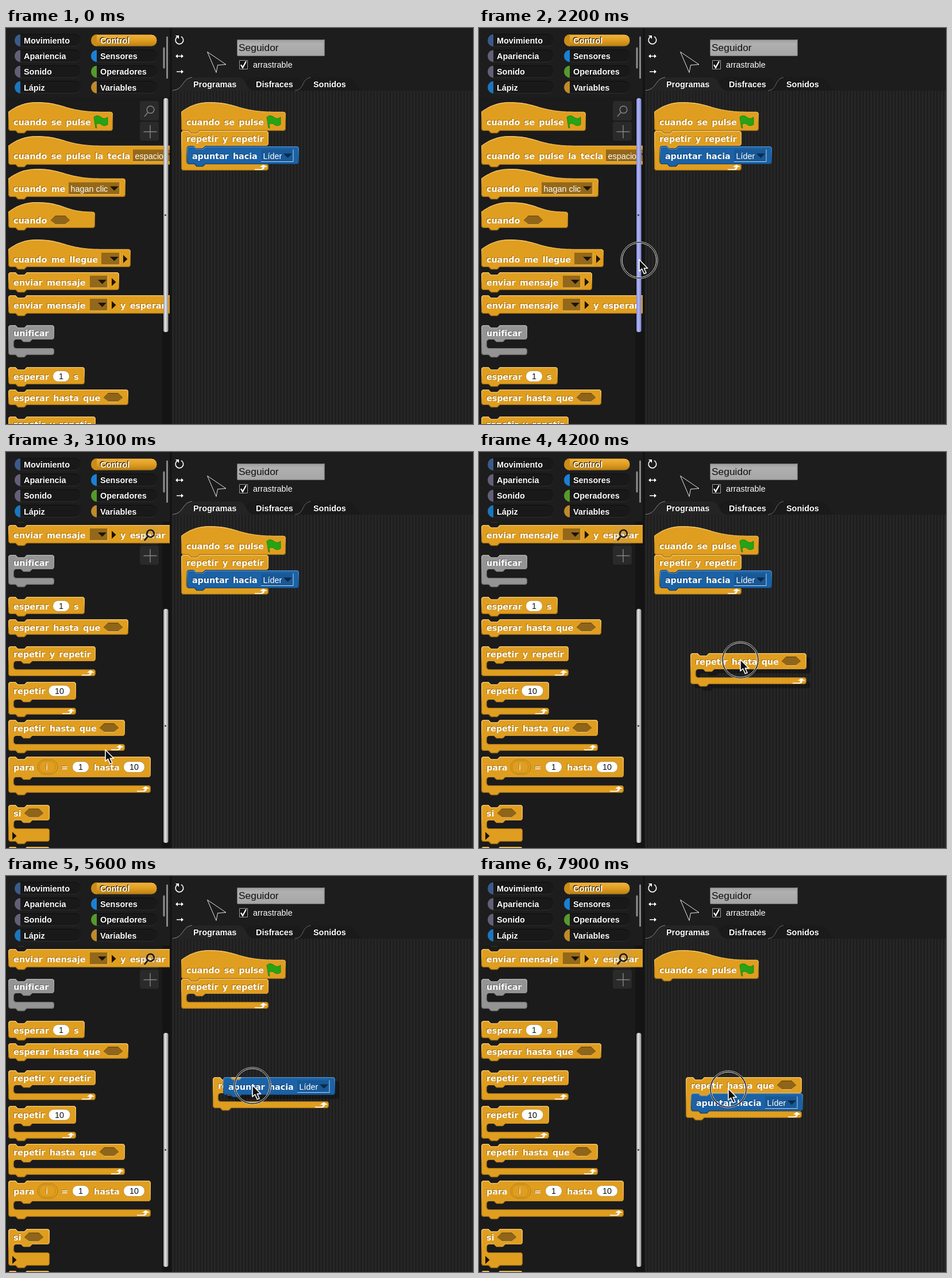
An HTML page that plays this animation: 813 by 689 pixels, repeating every 8000 ms.

```html
<!DOCTYPE html>
<html lang="es">
<head>
<meta charset="utf-8">
<title>Editor de bloques</title>
<style>
  html, body { margin: 0; width: 100%; height: 100%; overflow: hidden; background: #1d1d1d; }
  svg { display: block; }
  text { white-space: pre; }
  .label { font: bold 14.25px "DejaVu Sans", Verdana, sans-serif; word-spacing: 2.4px; fill: #fff; }
  .orange .label { text-shadow: -1px -1px 0 #9c6c10; }
  .blue .label { text-shadow: -1px -1px 0 #10406e; }
  .grey .label { text-shadow: -1px -1px 0 #626262; }
  .plain { font: 14.4px "Liberation Sans", Arial, sans-serif; fill: #fff; }
  .bold { font: bold 14.4px "Liberation Sans", Arial, sans-serif; fill: #fff; text-shadow: -1px -1px 0 #000; }
  .body { stroke-width: 2.6; }
  .orange > .body { fill: #e09e20; stroke: url(#edgeOrange); }
  .blue > .body { fill: #1b62a6; stroke: url(#edgeBlue); }
  .grey > .body { fill: #949494; stroke: url(#edgeGrey); }
  .dragged { filter: drop-shadow(7px 7px 0 rgba(0, 0, 0, .3)); }
</style>
</head>
<body>
<svg id="stage" width="813" height="689" viewBox="0 0 813 689">
  <defs>
    <linearGradient id="edgeOrange" x2="0" y2="1"><stop stop-color="#f6cd7c"/><stop offset=".35" stop-color="#eab450"/><stop offset=".6" stop-color="#b98018"/><stop offset="1" stop-color="#9a6c14"/></linearGradient>
    <linearGradient id="edgeBlue" x2="0" y2="1"><stop stop-color="#5a94cc"/><stop offset=".5" stop-color="#1b62a6"/><stop offset="1" stop-color="#0e3c68"/></linearGradient>
    <linearGradient id="edgeGrey" x2="0" y2="1"><stop stop-color="#b8b8b8"/><stop offset=".5" stop-color="#8c8c8c"/><stop offset="1" stop-color="#666"/></linearGradient>
    <linearGradient id="sunk" x2="0" y2="1"><stop stop-color="#5a3e0c"/><stop offset=".5" stop-color="#8a6118"/><stop offset="1" stop-color="#f0c265"/></linearGradient>
    <linearGradient id="pillEdge" x2="0" y2="1"><stop stop-color="#0c0c0c"/><stop offset="1" stop-color="#2e2e2e"/></linearGradient>
    <linearGradient id="pill" x2="0" y2="1"><stop stop-color="#f0b443"/><stop offset=".5" stop-color="#e09e20"/><stop offset="1" stop-color="#b87e12"/></linearGradient>
    <linearGradient id="field" x2="0" y2="1"><stop stop-color="#9c9c9c"/><stop offset=".25" stop-color="#b0b0b0"/><stop offset="1" stop-color="#a6a6a6"/></linearGradient>
    <linearGradient id="bar"><stop stop-color="#8a8a8a"/><stop offset=".4" stop-color="#e6e6e6"/><stop offset="1" stop-color="#909090"/></linearGradient>
    <linearGradient id="barHot"><stop stop-color="#7c83c8"/><stop offset=".4" stop-color="#b2b8fb"/><stop offset="1" stop-color="#7f86cc"/></linearGradient>
    <pattern id="stripes" x="289" width="5.6" height="8" patternUnits="userSpaceOnUse"><path fill="#262626" d="M0 0h5.600v8H0z"/><path fill="#1c1c1c" d="M3.400 0h2.200v8H3.400z"/></pattern>
    <clipPath id="paletteClip"><path d="M0 122h285v567H0z"/></clipPath>
  </defs>

  <!-- panels -->
  <path fill="#1d1d1d" d="M0 0h813v689H0z"/>
  <path fill="#1b1b1b" d="M0 121h285v568H0z"/>
  <path fill="#141414" d="M272 121h13v568h-13zM285 0h4v689h-4z"/>
  <path fill="url(#stripes)" d="M289 109h524v580H289z"/>
  <g id="categories"></g>
  <path stroke="#8e8e8e" stroke-width="3" stroke-linecap="round" d="M275 35v34"/>
  <path stroke="#9c9c9c" stroke-width="2.5" stroke-linecap="round" d="M280.5 16v71"/>

  <!-- sprite header -->
  <g fill="none" stroke="#fff" stroke-width="1.6">
    <path d="M298 15.5A6.8 6.8 0 1 0 305 15"/>
    <path d="M297 49h10M297 76h10" stroke-width="1.4"/>
  </g>
  <path fill="#fff" d="M295 13h6v6zM295 49l4-3.5v7zM309 49l-4-3.5v7zM309 76l-4-3.5v7z"/>
  <path fill="#1a1a1a" stroke="#e8e8e8" d="M350.500 41.500L383 63.500L368.500 64.500L366 77.500Z"/>
  <path fill="url(#field)" stroke="#6e6e6e" d="M402.500 20.500h151v27h-151z"/>
  <path fill="none" stroke="#d0d0d0" d="M403 48h151V20"/>
  <text x="405" y="40" class="plain" style="font-size:17.4px;fill:#111">Seguidor</text>
  <path fill="#161616" stroke="#a0a0a0" d="M406.500 56.500h14v15h-14z"/>
  <path fill="none" stroke="#fff" stroke-width="2.2" d="M409 64l3 5 6-11"/>
  <text x="430" y="69" class="plain">arrastrable</text>
  <g fill="none">
    <path fill="#1a1a1a" d="M500 109C516 108 512 86 530 86H594C610 86 608 108 624 109"/>
    <path fill="#1a1a1a" d="M400 109C416 108 414 86 430 86H502C516 86 514 108 530 109"/>
    <path stroke="#6c6c6c" d="M503 109C520 107 514 89 530 86"/>
    <path fill="#242424" d="M290 109C310 108 304 86 324 86H404C420 86 416 108 432 109"/>
    <path stroke="#8a8a8a" d="M290 108.500C310 107 306 88 324 86"/>
  </g>
  <text x="326" y="103" class="bold">Programas</text>
  <text x="435" y="103" class="bold">Disfraces</text>
  <text x="535" y="103" class="bold">Sonidos</text>

  <!-- palette -->
  <g clip-path="url(#paletteClip)"><g id="palette"></g></g>
  <g fill="rgba(150,150,150,.12)"><rect x="233" y="127" width="33" height="34" rx="4"/><rect x="233" y="163" width="33" height="33" rx="4"/></g>
  <g id="lens" fill="none"><circle cx="251.500" cy="142" r="6.300"/><path d="M247 147l-6 7"/></g>
  <path stroke="#858585" stroke-width="1.4" d="M239.500 180.500h23M251 169v23"/>
  <g id="thumb"><rect x="274" y="122" width="8.500" height="407" rx="3.500"/><circle cx="277.500" cy="325.500" r="1.500" fill="#333"/></g>

  <g id="scripts"></g>

  <g id="pointer">
    <g id="ring" fill="none"><circle cy="1" r="31" stroke="#161616" stroke-width="2.500"/><circle cy="1" r="32.200" stroke="#d8d8d8" stroke-width=".9"/><circle cy="1" r="29.800" stroke="#e6e6e6"/></g>
    <path fill="#111" stroke="#fff" stroke-width="1.600" stroke-linejoin="round" d="M0 0V20L4.500 16L8.300 24.500L12 23L8.300 15H14.500Z"/>
  </g>
</svg>

<script>
const LOOP = 8000, TICK = 100, SCROLL = 338, TRAVEL = 151;
const C = 4.2;                      // corner radius, also notch depth
const $ = id => document.getElementById(id);

function add(parent, tag, attrs = {}, text) {
  const el = document.createElementNS('http://www.w3.org/2000/svg', tag);
  for (const k in attrs) el.setAttribute(k, attrs[k]);
  if (text !== undefined) el.textContent = text;
  return parent.appendChild(el);
}

const arc = (x, y, sweep = 1) => `A${C} ${C} 0 0 ${sweep} ${x} ${y}`;
const notch = y => `L12.6 ${y}L16.8 ${y + C}H28L32.2 ${y}`;
const nub = (x, y) => `L${x + 32.2} ${y}L${x + 28} ${y + C}H${x + 16.8}L${x + 12.6} ${y}`;

// Outline of a block: hat or notch on top, optional C slot, nub unless capped
function outline({ w, h, hat, slot, foot, cap }) {
  const top = hat ? 16.8 : 0, arm = 9.5;
  let d = hat
    ? `M0 16.8A79.85 79.85 0 0 1 49 0C98 0 98 16.8 ${Math.min(166.6, w - C)} 16.8`
    : `M0 ${C}${arc(C, 0)}${notch(0)}`;
  d += `H${w - C}${arc(w, top + C)}V${h - C}${arc(w - C, h)}`;
  let end = h;
  if (slot) {
    const y = h + slot;
    end = y + foot;
    d += `${nub(arm, h)}H${arm + C}${arc(arm, h + C, 0)}V${y - C}${arc(arm + C, y, 0)}`;
    d += `H${w - C}${arc(w, y + C)}V${end - C}${arc(w - C, end)}`;
  }
  if (!cap) d += nub(0, end);
  return `${d}H${C}${arc(0, end - C)}Z`;
}

const parts = {
  text: (g, x, y, s) => add(g, 'text', { x, y: y + 5.5, class: 'label' }, s),
  menu(g, x, y, w, s = '', blue) {
    add(g, 'rect', { x, y: y - 11, width: w, height: 21, fill: blue ? '#185896' : '#94681a' });
    add(g, 'path', { d: `M${x} ${y + 10}h${w}v-21`, fill: 'none', stroke: blue ? '#b9d3ec' : '#f1c163' });
    add(g, 'text', { x: x + 3.5, y: y + 5, class: 'plain' }, s);
    add(g, 'path', { d: `M${x + w - 17} ${y - 4}h15l-7.500 7.500z`, fill: blue ? '#0b2a48' : '#1d1504' });
  },
  hex: (g, x, y) => add(g, 'path', {
    d: `M${x} ${y}l8-7.500h17l8 7.500-8 7.500h-17z`, fill: '#8f651a', stroke: 'url(#sunk)'
  }),
  num(g, x, y, rx, s) {
    add(g, 'rect', { x: x - rx, y: y - 9.5, width: 2 * rx, height: 19, rx: 9.5, fill: '#fff', stroke: '#a97714', 'stroke-width': .7 });
    add(g, 'text', { x, y: y + 5, class: 'plain', 'text-anchor': 'middle', style: 'fill:#111' }, s);
  },
  play: (g, x, y) => add(g, 'path', { d: `M${x} ${y - 7}l7.500 7-7.500 7z`, fill: '#1b1405' }),
  flag: (g, x, y) => add(g, 'path', {
    d: `M${x} ${y - 8}q6-5 12 0t12 0v13q-6 4-11 0t-9 0l1 6h-2z`, fill: '#23a515', stroke: '#23760f', 'stroke-width': .8
  }),
  ring(g, x, y, s) {
    add(g, 'rect', { x, y: y - 13, width: 35, height: 26, rx: 13, fill: 'none', stroke: '#b27c14' });
    add(g, 'rect', { x: x + 3, y: y - 10.5, width: 28, height: 21, rx: 10, fill: 'none', stroke: '#b98419' });
    add(g, 'text', { x: x + 14, y: y + 5, class: 'label', style: 'font-weight:normal' }, s);
  }
};

let blocks = 0;

// base: text baseline below the block's top
function block(parent, x, y, shape, base, list, color = 'orange') {
  const g = add(parent, 'g', { class: color, transform: `translate(${x} ${y})` });
  const d = outline(shape), id = `block${blocks++}`;
  add(add(g, 'clipPath', { id }), 'path', { d });
  add(g, 'path', { class: 'body', d, 'clip-path': `url(#${id})` });   // bevel stays inside
  for (const [kind, dx, ...args] of list) parts[kind](g, dx, base - 5.5, ...args);
  if (shape.loop) {
    add(g, 'path', {
      transform: `translate(${shape.w} ${shape.h + shape.slot + 1})`, fill: '#fff',
      d: 'M-24 8.500H-14Q-10.500 8.500-10.500 5H-15L-9 .5L-2 5H-7Q-7 10-13 10H-24Z'
    });
  }
  return g;
}

const hat = (w, h) => ({ w, h, hat: true });
const loop = (w, h, slot = 14, foot = 12) => ({ w, h, slot, foot, loop: true });
const forever = slot => ({ ...loop(152, 26, slot), cap: true });
const foreverParts = [['text', 9, 'repetir y repetir']];
const untilParts = [['text', 9, 'repetir hasta que'], ['hex', 159]];
const flagParts = [['text', 9, 'cuando se pulse'], ['flag', 149]];
const sendParts = [['text', 9, 'enviar mensaje'], ['menu', 142, 31], ['play', 180]];

[
  [129, hat(182, 50), 39.5, flagParts],
  [188, hat(310, 50), 40, [['text', 9, 'cuando se pulse la tecla'], ['menu', 217, 78, 'espacio']]],
  [245, hat(204, 49), 40, [['text', 9, 'cuando me'], ['menu', 105, 89, 'hagan clic']]],
  [303, hat(151, 45), 37, [['text', 9, 'cuando'], ['hex', 74]]],
  [368, hat(213, 48), 39.5, [['text', 9, 'cuando me llegue'], ['menu', 162, 32], ['play', 200]]],
  [425, { w: 193, h: 31 }, 22.5, sendParts],
  [465, { w: 300, h: 32 }, 22.5, [...sendParts, ['text', 195, 'y esperar']]],
  [517, { w: 80, h: 25, slot: 15, foot: 12 }, 18.5, [['text', 9, 'unificar']], 'grey'],
  [590, { w: 133, h: 30 }, 21.5, [['text', 9, 'esperar'], ['num', 92, 14.5, '1'], ['text', 114, 's']]],
  [629, { w: 209, h: 27 }, 19.5, [['text', 9, 'esperar hasta que'], ['hex', 166]]],
  [676, forever(14), 18.5, foreverParts],
  [738, loop(118, 31), 21, [['text', 9, 'repetir'], ['num', 89, 19, '10']]],
  [804, loop(203, 28), 19.5, untilParts],
  [868, loop(248, 36, 14, 13), 23.5, [['text', 9, 'para'], ['ring', 51, 'i'], ['text', 92, '='],
    ['num', 126, 14.5, '1'], ['text', 149, 'hasta'], ['num', 219, 18.5, '10']]],
  [952, { w: 72, h: 27, slot: 14, foot: 23 }, 20, [['text', 9, 'si'], ['hex', 28]]],
  [1025, { w: 72, h: 27 }, 20, []]
].forEach(([y, ...rest]) => block($('palette'), 4, y, ...rest));
parts.play($('palette'), 11, 1006);

const scripts = $('scripts');
block(scripts, 305, 129, hat(182, 50), 39.5, flagParts);
const foreverFull = block(scripts, 305, 179, forever(31), 18.5, foreverParts);
const untilEmpty = block(scripts, 0, 0, loop(202, 28), 19.5, untilParts);
const untilFull = block(scripts, 360, 350, loop(202, 28, 31), 19.5, untilParts);
const foreverEmpty = block(scripts, 305, 179, forever(14), 18.5, foreverParts);
const aim = block(scripts, 315, 206, { w: 195, h: 31 }, 22,
  [['text', 9, 'apuntar hacia'], ['menu', 129, 56, 'Líder', true]], 'blue');

['Movimiento #3b5a8a', 'Apariencia #655e78', 'Sonido #655e78', 'Lápiz #1b76bd',
 'Control', 'Sensores #1a80d4', 'Operadores #57992b', 'Variables #c08a2a'].forEach((item, i) => {
  const [name, tint] = item.split(' ');
  const x = i < 4 ? 15 : 148, y = 11 + 27.2 * (i % 4), g = $('categories');
  const size = { x, y, width: 115, height: 21, rx: 10 };
  add(g, 'rect', { ...size, fill: tint ? '#191919' : 'url(#pill)', stroke: 'url(#pillEdge)' });
  add(g, 'path', { d: `M${x + 10} ${y}a10 10.500 0 0 0 0 21z`, fill: tint || '#c98c1a' });
  add(g, 'text', { x: x + 16, y: y + 16, class: 'bold' }, name);
});

// Pointer path: time, x, y
const path = [
  [1600, 340, 340], [2000, 279, 403], [2200, 279, 403], [2700, 281, 554], [2800, 281, 554],
  [3100, 173, 518], [3400, 91, 478], [3500, 91, 478], [4200, 455, 361], [4400, 447, 361],
  [4500, 447, 361], [4900, 366, 220], [5000, 366, 220], [5600, 429, 364], [5900, 420, 390],
  [6000, 420, 390], [6400, 365, 199], [6500, 365, 199], [6900, 278, 263], [7200, 110, 310],
  [7300, 110, 310], [7700, 440, 378], [7900, 434, 370]
];
const presses = [[2100, 2800], [3400, 4500], [4900, 6000], [6400, 7300], [7800, 8000]];

function pointerAt(t) {
  const i = path.findIndex(p => p[0] > t);
  if (i < 1) return (i ? path[path.length - 1] : path[0]).slice(1);
  const [t0, x0, y0] = path[i - 1], [t1, x1, y1] = path[i];
  const u = (t - t0) / (t1 - t0), k = u * u * (3 - 2 * u);
  return [x0 + (x1 - x0) * k, y0 + (y1 - y0) * k];
}

const within = (t, a, b) => t >= a && t < b;
const show = (el, on) => el.setAttribute('visibility', on ? 'visible' : 'hidden');
const move = (el, x, y) => el.setAttribute('transform', `translate(${x.toFixed(1)} ${y.toFixed(1)})`);

// Block follows the pointer from a to b, held at (dx, dy)
function drag(el, t, a, b, dx, dy) {
  const [x, y] = pointerAt(Math.min(Math.max(t, a), b));
  move(el, x - dx, y - dy);
  el.classList.toggle('dragged', within(t, a, b));
}

function draw(t) {
  const [x, y] = pointerAt(t);
  move($('pointer'), x, y);
  show($('pointer'), t >= 1600);
  show($('ring'), t >= 1600 && presses.some(([a, b]) => within(t, a, b)));

  const barY = pointerAt(Math.min(Math.max(t, 2200), 2700))[1] - 403;
  move($('palette'), 0, -SCROLL * barY / TRAVEL);
  move($('thumb'), 0, barY);
  $('thumb').firstChild.setAttribute('fill', within(t, 2000, 2900) ? 'url(#barHot)' : 'url(#bar)');
  const covered = barY > TRAVEL * .9;
  $('lens').setAttribute('stroke', covered ? '#151515' : '#858585');
  $('lens').setAttribute('stroke-width', covered ? 2.5 : 1.5);

  show(foreverFull, t < 5000);
  show(foreverEmpty, within(t, 5000, 7300));
  drag(foreverEmpty, t, 6500, 7300, 60, 20);
  show(untilEmpty, within(t, 3500, 6000));
  drag(untilEmpty, t, 3500, 4500, 87, 11);
  show(untilFull, t >= 6000);
  drag(aim, t, 5000, 6000, 51, 14);
  if (t >= 6000) move(aim, 369, 378);
}

function frame(now) {
  draw(Math.floor((now + 1) / TICK) * TICK % LOOP);
  requestAnimationFrame(frame);
}
draw(0);
requestAnimationFrame(frame);
</script>
</body>
</html>
```
